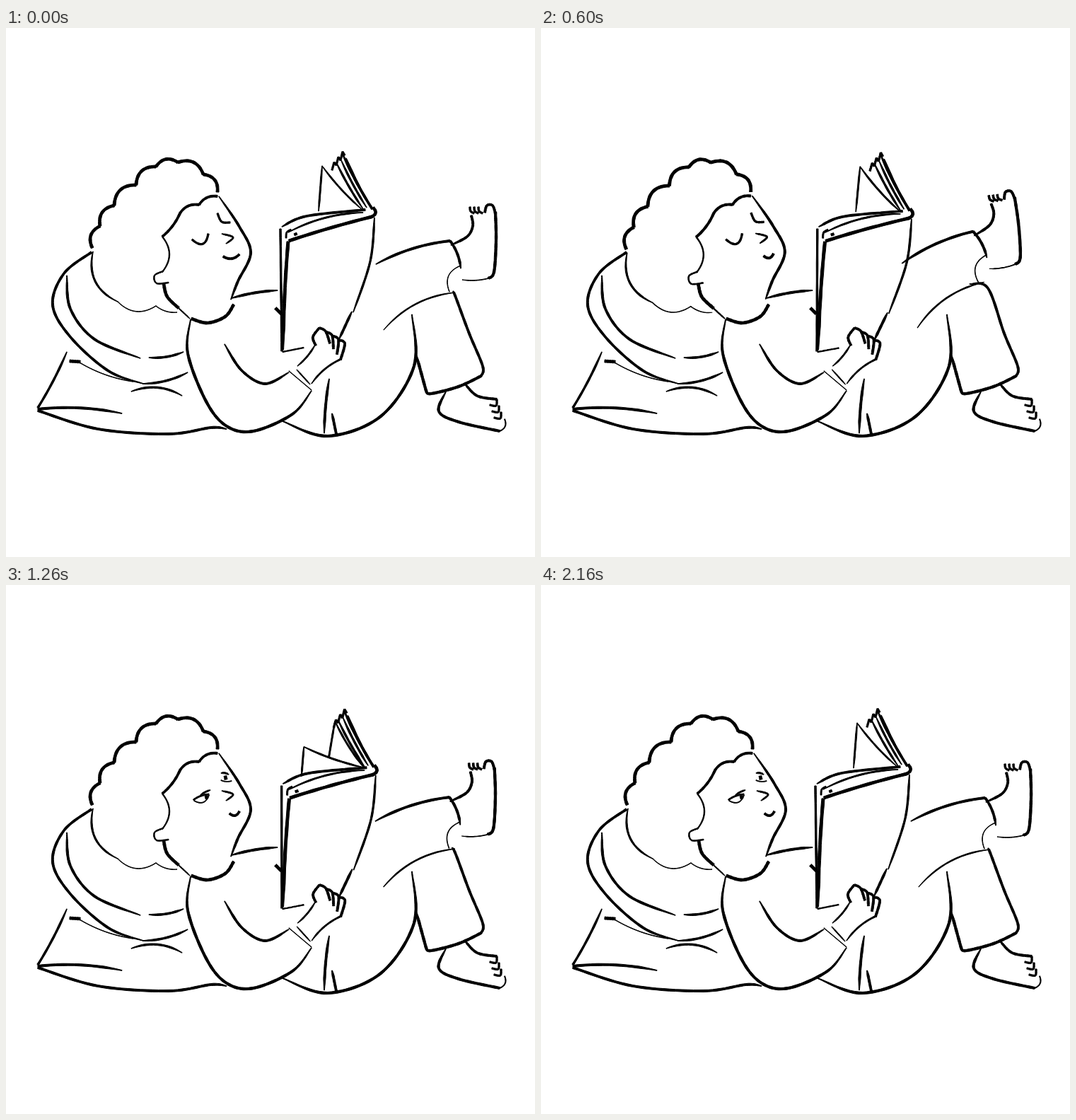
Write an HTML page that moves like this. It is 748 by 748 pixels and loops after 2.4 s.

```html
<!DOCTYPE html>
<html lang="en">
<head>
<meta charset="utf-8">
<title>Reading on a pillow</title>
<style>
html, body { margin: 0; width: 100%; height: 100%; overflow: hidden; background: #fff; }
svg { display: block; width: 100%; height: 100%; }
path { stroke: #000; stroke-linejoin: round; }
</style>
</head>
<body>
<svg id="stage" viewBox="0 0 748 748"></svg>
<script>
const stage = document.getElementById("stage");
const BOLD = 4.8, MEDIUM = 4, FINE = 3, HAIR = 1.6;

function add(tag, parent) {
  return parent.appendChild(document.createElementNS("http://www.w3.org/2000/svg", tag));
}

const mix = (a, b, k) => a + (b - a) * k;
const mixPoint = (p, q, k) => p.map((v, i) => mix(v, q[i], k));
const toPoints = text => text.split(" ").map(p => p.split(",").map(Number));
const clamp = v => Math.max(0, Math.min(1, v));

function ease(t, from, to) {
  const p = clamp((t - from) / (to - from));
  return p < .5 ? 4 * p ** 3 : 1 - 4 * (1 - p) ** 3;
}
const swing = (t, out, outEnd, back, backEnd) => ease(t, out, outEnd) - ease(t, back, backEnd);

// Smooth Catmull-Rom curve through key points
function spline(points, steps = 12) {
  const result = [points[0]], last = points.length - 1;
  for (let i = 0; i < last; i++) {
    const a = points[Math.max(0, i - 1)], b = points[i];
    const c = points[i + 1], d = points[Math.min(last, i + 2)];
    for (let j = 1; j <= steps; j++) {
      const u = j / steps;
      result.push([0, 1].map(k => b[k] + .5 * u * (c[k] - a[k] +
        u * (2 * a[k] - 5 * b[k] + 4 * c[k] - d[k] + u * (3 * (b[k] - c[k]) + d[k] - a[k])))));
    }
  }
  return result;
}

// Arc whose height is a share of its chord, positive to the left of travel
function bowed(a, b, bow, steps = 14) {
  const dx = b[0] - a[0], dy = b[1] - a[1];
  return Array.from({ length: steps + 1 }, (_, i) => {
    const u = i / steps, h = 4 * bow * u * (1 - u);
    return [a[0] + dx * u + dy * h, a[1] + dy * u - dx * h];
  });
}

// Outline of a brush stroke: tapers at the start (s), end (e) or both (b)
function brush(points, width, taper = "") {
  const left = [], right = [], n = points.length - 1;
  points.forEach(([x, y], i) => {
    const p = points[Math.max(0, i - 1)], q = points[Math.min(n, i + 1)];
    const dx = q[0] - p[0], dy = q[1] - p[1], len = Math.hypot(dx, dy) || 1, u = i / n;
    let h = Math.max(.05, (width - 1) / 2) * (1 + .07 * Math.sin(i * 1.9));
    if (/[sb]/.test(taper)) h *= Math.min(1, .25 + u * 4);
    if (/[eb]/.test(taper)) h *= Math.min(1, .25 + (1 - u) * 4);
    left.push([x - dy / len * h, y + dx / len * h]);
    right.unshift([x + dy / len * h, y - dx / len * h]);
  });
  return "M" + [...left, ...right].map(p => p.map(v => v.toFixed(2)).join()).join("L") + "Z";
}

function ink(layer, d) {
  const path = add("path", layer);
  path.setAttribute("d", d);
  return path;
}
const curve = (layer, text, width, taper) => ink(layer, brush(spline(toPoints(text)), width, taper));

function arcs(layer, text, bow, width, taper) {
  const points = toPoints(text);
  points.slice(1).forEach((p, i) => ink(layer, brush(bowed(points[i], p, bow), width, taper)));
}

function hook(layer, x, y, offsets, width) {
  ink(layer, brush(spline([[x, y], ...offsets.map(([dx, dy]) => [x + dx, y + dy])]), width));
}

function drawCushions(g) {
  curve(g, "121,317 82,347 66,392 92,438 145,485 194,503", MEDIUM, "e");
  curve(g, "86,350 91,397 125,440 190,467", MEDIUM, "b");
  arcs(g, "202,466 251,458", -.06, 3.6, "b");
  arcs(g, "194,503 257,487", -.06, 3.6, "b");
  arcs(g, "86,458 45,537", .02, 3.6, "s");
  curve(g, "45,541 130,567 230,574 290,565 312,567", MEDIUM, "e");
  arcs(g, "45,539 164,545", .04, MEDIUM, "e");
  arcs(g, "90,471 105,472", 0, BOLD);
  arcs(g, "104,473 180,500", -.05, HAIR);
  arcs(g, "177,514 249,520", .12, 3.4, "b");
}

function drawBody(g) {
  curve(g, "262,411 285,417 310,408 322,391", BOLD);
  curve(g, "261,412 257,460 283,528 312,563 350,570 405,546 432,513", 4.4, "b");
  curve(g, "309,447 333,484 366,503 400,487", MEDIUM, "b");
  arcs(g, "400,485 432,512", 0, HAIR);
  arcs(g, "319,382 384,371", .03, MEDIUM, "b");
  arcs(g, "381,396 389,404", 0, 5);
  curve(g, "391,556 455,577 530,549 577,478 574,405", 4.4, "b");
  arcs(g, "457,496 450,573", -.02, MEDIUM, "b");
  arcs(g, "461,545 467,574", 0, MEDIUM, "s");
}

function drawBackFoot(g) {
  arcs(g, "580,462 594,513", 0, 4.4, "s");
  curve(g, "594,513 601,517 640,507 672,492", 4.4);
  curve(g, "622,514 612,542 640,557 698,570", 4.2, "s");
  arcs(g, "698,570 705,553", -.25, 2.2);
  curve(g, "648,502 666,520 694,525", MEDIUM, "s");
  for (let i = 0; i < 3; i++) hook(g, 684 + 3 * i, 533 + 9 * i, [[9, 1], [10, -8]], 3.4);
}

function drawHand(g) {
  curve(g, "438,449 434,437 443,424", MEDIUM);
  for (let i = 0; i < 4; i++) {
    hook(g, 443 + 9 * i, 424 + 5.7 * i, [[9, 5], [15 - 4 * i, 22 + 2 * i]], MEDIUM);
  }
  arcs(g, "437,448 412,478", .05, FINE, "b");
  arcs(g, "474,468 432,503", -.07, FINE, "e");
  arcs(g, "411,483 430,504", 0, 2.4, "b");
}

function drawHead(g) {
  arcs(g, "122,311 133,280 153,251 184,222 212,196 243,190 279,207 299,232", .24, BOLD);
  arcs(g, "123,316 158,387", -.2, 3.2, "b");
  arcs(g, "158,387 212,393", -.2, HAIR);
  arcs(g, "212,393 242,402", -.1, HAIR, "e");
  arcs(g, "299,238 273,250 246,262", -.16, MEDIUM);
  arcs(g, "246,262 221,295", .06, MEDIUM);
  arcs(g, "221,295 221,345", .2, 2.4);
  curve(g, "222,344 210,350 213,361 230,360", 2.6);
  curve(g, "223,362 228,380 244,396", BOLD);
  arcs(g, "244,396 260,411", 0, 2.4, "e");
  curve(g, "301,238 330,281 346,318 328,358 318,384", MEDIUM, "b");
  curve(g, "305,291 321,296 311,305", FINE, "b");
}

function drawClosedEyes(g) {
  arcs(g, "263,299 286,291", -.45, 3.4);
  curve(g, "299,262 305,274 317,275", 3.4);
}

function drawOpenEyes(g) {
  arcs(g, "275,297 289,290", .05, FINE, "b");
  arcs(g, "265,304 287,296", .08, FINE);
  arcs(g, "266,305 287,297", -.3, 2);
  arcs(g, "283,298 284,302", 0, 5);
  arcs(g, "304,266 315,268", .1, 3.2, "b");
  arcs(g, "310,270 311,275", 0, 5);
  arcs(g, "304,276 319,277", -.1, 2);
}

function drawBook(g) {
  arcs(g, "388,284 390,457", 0, 3.4);
  arcs(g, "399,302 392,455", -.01, 5, "e");
  arcs(g, "391,458 421,452", 0, 2.4);
  arcs(g, "400,301 517,267", .01, BOLD);
  arcs(g, "517,267 519,254", -.35, BOLD);
  curve(g, "390,281 425,266 508,257", 3.8, "s");
  arcs(g, "399,289 505,261", .06, FINE, "b");
  curve(g, "396,297 397,289 403,285", FINE);
  arcs(g, "409,290 410,293", 0, 5);
  curve(g, "521,268 515,330 491,402", 3.4, "b");
  arcs(g, "489,401 471,440", 0, MEDIUM, "b");
  // Fanned page block: a ragged top and edges running to the spine
  for (let i = 0; i < 3; i++) {
    const low = [461 + 6 * i, 201 - 7 * i], peak = [464 + 6 * i, 190 - 7.5 * i];
    ink(g, brush(bowed(low, peak, 0), 3.4));
    ink(g, brush(bowed(peak, [467 + 6 * i, 194 - 7 * i], 0), 3.4));
    ink(g, brush(bowed([467 + 7 * i, 190 - 3 * i], [505 + 5 * i, 256 - 2 * i], -.02), 3.4, "b"));
  }
  arcs(g, "475,176 518,256", -.02, MEDIUM, "s");
}

function drawCrossedLeg(g) {
  arcs(g, "523,334 628,301", .05, MEDIUM, "s");
  arcs(g, "628,301 643,340", .07, MEDIUM, "e");
  arcs(g, "643,336 627,373", -.25, HAIR);
  arcs(g, "534,427 635,374", .1, 2.6, "b");
  curve(g, "629,307 652,295 660,280 658,265", MEDIUM, "s");
  for (let i = 0; i < 3; i++) hook(g, 656 + 6 * i, 253, [[1, 6], [6, 9]], 3.6);
  curve(g, "677,261 680,251 688,251 692,262", MEDIUM);
  curve(g, "692,260 693,300 690,345 682,354", 4.4);
  arcs(g, "682,354 645,356", .05, 1.8, "e");
}

function part(draw, parent = stage) {
  const group = add("g", parent);
  draw(group);
  return group;
}

part(drawCushions);
part(drawBody);
part(drawBackFoot);
const knee = ink(stage, "");
const leg = part(drawCrossedLeg);
const head = part(drawHead);
const closedEyes = part(drawClosedEyes, head);
const openEyes = part(drawOpenEyes, head);
const mouth = ink(head, "");
const book = add("g", stage);
const risingPage = ink(book, "");
const pageFill = ink(book, "");
pageFill.style = "fill:#fff;stroke:none";
const fallingPage = ink(book, "");
part(drawBook, book);
const hand = part(drawHand);

const gutter = [504, 257];
const upright = { tip: [447, 195], base: [442, 259] };
const stacked = { tip: [470, 190], base: [457, 257] };

const pageCurve = tip => bowed(tip, gutter, -.03);
const pageInk = (tip, base) => brush(bowed(tip, base, 0), FINE, "b") + brush(pageCurve(tip), FINE, "b");

function drawPages(t) {
  const fall = ease(t, 1050, 1470);
  const tip = [mix(upright.tip[0], 391, fall), mix(upright.tip[1], 279, fall) - 34 * fall * (1 - fall)];
  const base = mixPoint(upright.base, [390, 281], fall);
  fallingPage.setAttribute("d", fall < 1 ? pageInk(tip, base) : "");
  pageFill.setAttribute("d", fall > 0 && fall < 1 ? "M" + [...pageCurve(tip), base].join("L") + "Z" : "");

  const rise = .8 * ease(t, 1050, 1500) + .2 * ease(t, 1680, 2160);
  risingPage.setAttribute("d", rise > 0 ? pageInk(
    mixPoint(stacked.tip, upright.tip, rise), mixPoint(stacked.base, upright.base, rise)) : "");
}

function draw(t) {
  const lift = swing(t % 1080, 60, 540, 600, 1080) + (t >= 2160 ? -swing(t % 1080, 60, 540, 600, 1080) : 0);
  leg.setAttribute("transform", `rotate(${-6.7 * lift} 506 440)`);
  const kneeTop = [mixPoint([632, 372], [606, 362], lift), mixPoint([636, 381], [632, 368], lift)];
  knee.setAttribute("d", brush(spline([...kneeTop, ...toPoints("655,432 674,478 672,492")]), MEDIUM, "s"));

  const nod = swing(t, 150, 600, 840, 1260);
  head.setAttribute("transform", `rotate(${-.75 * nod} 262 412)`);
  const smile = ease(t, 180, 600);
  mouth.setAttribute("d", brush(bowed([mix(307, 316, smile), 323], [330, 320], mix(-.2, -.32, smile)), MEDIUM));
  const awake = t >= 720;
  closedEyes.style.display = awake ? "none" : "";
  openEyes.style.display = awake ? "" : "none";

  const tilt = swing(t, 360, 900, 960, 1440);
  book.setAttribute("transform", `rotate(${2.6 * tilt} 390 458)`);
  hand.setAttribute("transform", `translate(${1.2 * tilt} 0)`);
  drawPages(t);
}

const start = performance.now();
function tick() {
  const t = (performance.now() - start) % 2400;
  draw(Math.floor(t / 30) * 30);
  requestAnimationFrame(tick);
}
tick();
</script>
</body>
</html>
```
